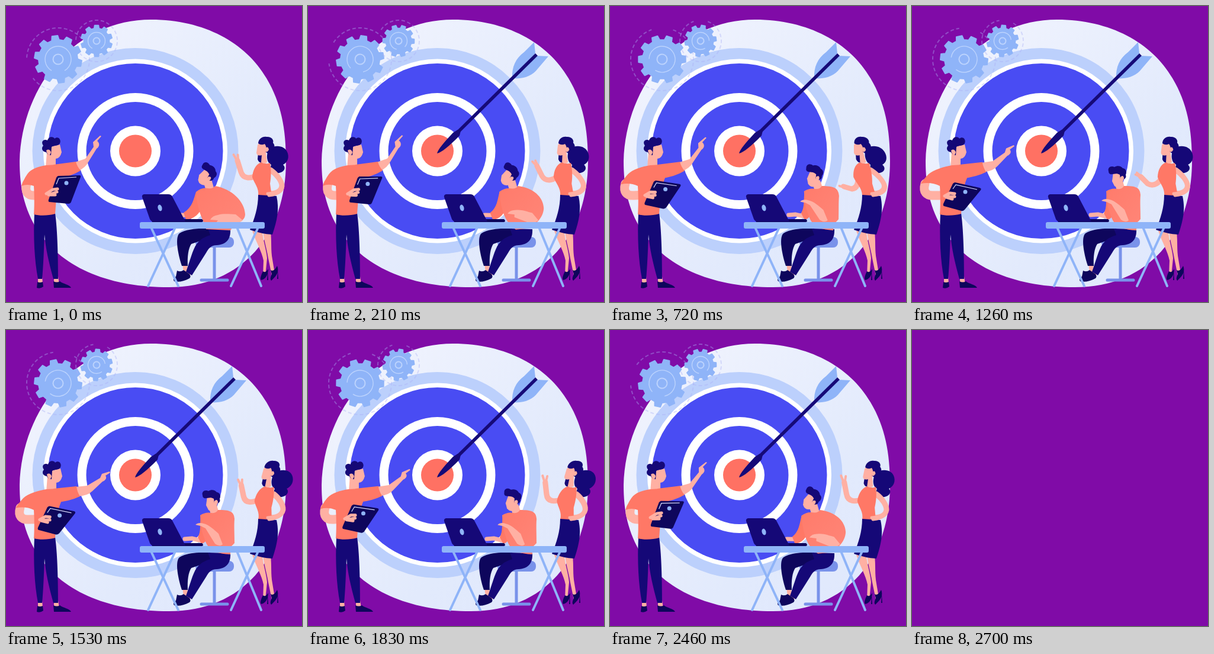
An HTML page that plays this animation: 500 px wide and 500 px high, repeating every 2.73 s.

```html
<!DOCTYPE html>
<html lang="en">
<head>
<meta charset="utf-8">
<title>On target</title>
<style>
  html, body { margin: 0; width: 100%; height: 100%; overflow: hidden; background: #800ba7; }
  svg { display: block; width: 100vw; height: 100vh; }
  .navy { fill: #150877; }
  .dark { fill: #0e065c; }
  .skin { fill: #ffb0a3; }
  .coral { fill: #ff7866; }
  .sky { fill: #8fb4f8; }
  .limb { fill: none; stroke: #ffb0a3; stroke-linecap: round; stroke-linejoin: round; }
  .rail { fill: none; stroke: #8fb4f8; stroke-width: 4; stroke-linecap: round; }
  .orbit { fill: none; stroke: #aab0f5; stroke-opacity: .4; stroke-width: 2; stroke-dasharray: 6 4; }
  .line { fill: none; stroke: #bcd3fd; stroke-width: 1.4; }
</style>
</head>
<body>
<svg viewBox="0 0 500 500">
  <defs>
    <linearGradient id="pale" x1="0" y1="0" x2="1" y2="1">
      <stop offset="0" stop-color="#f3f5fe"/><stop offset=".65" stop-color="#e2eafc"/><stop offset="1" stop-color="#e0e8fd"/>
    </linearGradient>
    <linearGradient id="shirt" x1="0" y1="0" x2="1" y2="1">
      <stop offset="0" stop-color="#ff7b6b"/><stop offset="1" stop-color="#ff8678"/>
    </linearGradient>
  </defs>
  <g id="scene">
    <path fill="url(#pale)" d="M245 23C335 23 405 62 440 122C465 164 473 208 473 262C473 385 400 475 275 475C180 475 98 446 54 380C30 342 23 305 23 262C27 130 120 23 245 23Z"/>
    <g id="rings"></g>
    <g id="gears"></g>

    <g id="arrow">
      <path class="sky" d="M345 122C344 103 351 88 365 78L382 61L384 80ZM345 122C364 124 379 118 388 106L406 85L386 84Z"/>
      <path d="M247 219L386 82" stroke="#160a78" stroke-width="5.5"/>
      <path fill="#160a78" d="M218 249C219 243 229 231 245 214L253 209L258 211L256 219C238 237 226 247 218 249Z"/>
    </g>

    <!-- man with tablet -->
    <g>
      <path class="skin" d="M54 457H61L62 469H54ZM81 457H88L90 470H81Z"/>
      <path class="navy" d="M48 350L83 350C87 378 88 425 88 461L80 461C72 432 67 410 65 386C64 414 63 440 61 461L54 461C48 430 46 390 48 350Z"/>
      <path class="dark" d="M53 466Q57 468 62 466L63 474Q58 478 52 476ZM80 465Q86 468 91 465C97 470 107 470 110 476H81Z"/>
      <g data-shift="nodL">
        <path class="skin" d="M69 247L74 238L91 234L94 247Q91 258 84 258L84 272L67 273Z"/>
        <path class="navy" d="M76 252C73 252 69 250 68 247C61 246 59 240 63 236C58 229 64 224 70 227C72 220 80 220 82 224C88 219 94 226 91 232C88 237 82 235 77 238Z"/>
        <path class="skin" d="M68 244Q73 240 76 247L74 252Q69 251 68 244Z"/>
      </g>
      <path class="skin" data-k="point" d="M116 264L134 258L148 238L147 230L159 219L161 220L154 228C159 232 158 238 153 241L140 262Q134 274 121 279Z"
        data-to="M118 265L137 263L159 250L162 243L175 239L176 241L168 246C171 250 168 254 163 256L146 272Q138 280 122 281Z"/>
      <path class="coral" data-k="point" d="M80 268L118 263Q120 271 126 278Q108 289 86 291Z" data-to="M80 268L119 264Q120 273 125 281Q108 289 86 291Z"/>
      <path class="limb" stroke-width="15" data-k="arm" d="M35 300C31 314 37 321 49 320L76 316" data-to="M22 300C18 314 24 321 37 320L62 320"/>
      <path class="coral" data-k="arm" d="M68 269C56 271 43 274 36 284C31 291 28 298 26 304Q36 300 47 304C48 320 48 340 47 352C58 355 72 354 83 351C85 335 84 310 94 288L85 268Z"
        data-to="M68 269C54 271 36 277 28 284C22 290 18 295 15 300Q33 297 47 304C48 320 48 340 47 352C58 355 72 354 83 351C85 335 84 310 94 288L85 268Z"/>
      <path class="dark" data-k="tablet" d="M88 287L124 286Q127 286 126 289L110 331Q109 334 105 334L73 331Q71 330 72 327L85 290Q86 288 88 287Z"
        data-to="M73 298L114 307Q118 308 116 311L89 344Q86 347 83 346L54 338Q52 337 53 334L69 300Q71 298 73 298Z"/>
      <path fill="none" stroke="#d7dcfb" stroke-width="1.2" data-k="tablet" d="M85 301L89 291L119 289" data-to="M69 309L74 302L110 310"/>
      <path fill="none" stroke="#8fb4f8" stroke-width="7" stroke-linecap="round" data-k="tablet" d="M102 299L102 299.1" data-to="M90 314L90 314.1"/>
      <path class="limb" stroke-width="5" data-k="arm" d="M68 317L79 310L87 309M72 319L86 314M72 319L83 319" data-to="M55 321L64 316L72 317M58 322L72 322M58 323L68 326"/>
    </g>

    <!-- woman -->
    <g>
      <path class="skin" d="M416 380L433 380C434 396 440 412 441 426L438 456L434 458L435 430C432 414 422 398 416 380ZM434 380L447 382C449 398 447 412 450 428L454 452L449 455L443 426C441 412 436 398 434 380Z"/>
      <path class="dark" d="M434 448Q438 452 443 444C443 454 438 462 431 463Q428 460 434 448ZM442 446L443 463L441 463ZM447 446Q452 450 458 439C461 446 459 453 453 459L448 464Q445 461 449 453ZM459 446L460 461L458 461Z"/>
      <g id="bust">
        <path class="navy" d="M446 241C454 234 472 235 476 249C479 259 473 266 468 268C474 274 469 281 461 282C450 284 445 275 448 268C439 264 439 247 446 241ZM426 248L437 246L440 264Q428 268 425 259Z"/>
        <path class="limb" stroke-width="9" d="M447 277C458 285 466 296 466 304C465 313 456 317 444 317"/>
        <path class="limb" stroke-width="9" data-k="wave" d="M426 280C423 301 419 308 410 309L397 305" data-mid="M426 278C422 302 404 304 396 298L385 284" data-to="M428 284C412 292 400 290 397 277L392 257"/>
        <path class="limb" stroke-width="4" data-k="wave" d="M400 307L390 304M400 308L394 305" data-mid="M388 286L376 280M387 284L378 276" data-to="M392 259L386 246M393 257L394 247"/>
        <path class="coral" d="M431 264Q440 268 446 265C448 278 448 288 446 300L449 321L426 320C428 308 419 299 416 289C417 278 421 268 431 264Z"/>
        <path class="skin" d="M425 235Q428 229 438 230L445 237Q442 245 439 248L441 264Q436 268 431 264L432 252Q424 254 423 248Z"/>
        <path class="navy" d="M426 232C427 224 433 220 440 221C448 220 453 226 451 231C456 236 453 245 446 244L442 249L438 246C440 240 440 237 437 233Q431 236 426 232Z"/>
        <path class="skin" d="M438 240Q443 236 444 243Q441 248 438 246Z"/>
      </g>
      <path class="navy" d="M426 319L457 321C462 344 458 362 450 386Q431 385 412 378C420 359 426 340 426 319Z"/>
      <path class="limb" stroke-width="5" d="M450 316L442 317M451 319L444 320"/>
    </g>

    <!-- man at desk -->
    <g>
      <path d="M352 400V462M330 463H374" fill="none" stroke="#7992ea" stroke-width="5" stroke-linecap="round"/>
      <rect x="320" y="390" width="65" height="18" rx="8" fill="#7992ea"/>
      <path class="skin" d="M298 434L306 434L307 449L300 450ZM304 446L314 449L309 459L302 457Z"/>
      <path class="dark" d="M345 376C325 375 303 377 293 384C286 390 289 414 297 439L307 439C306 424 308 409 313 402L345 391Z"/>
      <path class="navy" d="M341 376L379 377C380 394 372 403 356 404C346 404 342 410 338 417L314 455L304 449C311 430 315 412 322 402Q330 391 345 387Z"/>
      <path class="dark" d="M289 447Q295 450 300 446L310 453Q313 457 310 460C301 465 291 467 284 465Q281 461 287 457Z"/>
      <path class="limb" stroke-width="7" data-k="sit" d="M297 353L308 354L318 350" data-to="M302 353L314 352L330 356"/>
      <path class="coral" data-k="sit" d="M321 314C317 326 315 340 300 349L304 361C318 360 328 350 332 338Z" data-to="M329 314C327 328 330 340 324 350L330 361C338 360 342 350 344 338Z"/>
      <path class="limb" stroke-width="14" data-k="sit" d="M340 294L344 308" data-to="M350 300L353 311"/>
      <path fill="url(#shirt)" data-k="sit" d="M321 314Q331 306 341 308Q350 309 353 304C382 309 403 330 404 352C404 360 397 365 388 367L379 379L338 377C334 362 323 348 321 314Z"
        data-to="M328 313Q337 307 347 309Q355 310 358 304C378 304 385 306 386 319C385 330 386 345 386 360L380 366L379 379L338 377C339 362 331 340 328 313Z"/>
      <path class="skin" data-k="sit" d="M345 361Q349 354 358 353C369 350 378 352 388 352L400 362Q394 368 378 367L354 367L358 362Z"
        data-to="M320 329Q325 324 334 327C343 329 351 337 359 344L366 362Q361 367 353 361L337 335L329 331Z"/>
      <g id="head">
        <path class="skin" d="M340 281L357 283L356 304Q349 310 342 304L338 296Z"/>
        <path class="navy" d="M332 279C330 273 336 269 342 272C347 269 353 270 356 274C362 275 363 281 361 285Q363 291 357 293L352 292L351 285C345 281 340 285 335 284Q332 283 332 279Z"/>
        <path class="skin" d="M352 289Q357 284 358 291Q357 297 352 295Z"/>
      </g>
    </g>

    <path class="rail" d="M246 376L291 473M285 376L240 473M391 376L431 473M425 376L380 473"/>
    <rect class="sky" x="226" y="365" width="211" height="11" rx="3"/>
    <path class="dark" d="M245 360H331Q333 361 333 364L331 365H247Z"/>
    <path class="navy" d="M233 318H274Q279 318 281 322L303 364H249Q245 364 243 360L230 323Q229 319 233 318Z"/>
    <ellipse class="sky" cx="260" cy="341" rx="3.5" ry="5.5" transform="rotate(-14 260 341)"/>
  </g>
</svg>
<script>
const LOOP = 2730, BLANK = 2700;
const TIMES = [0, 420, 720, 1260, 1530, 2130];
const TRACKS = {
  arm: [0, .27, .7, 1, .85, .12],
  tablet: [0, .3, .7, 1, .95, .45],
  point: [0, 0, .13, .8, 1, .5],
  nodL: [0, -2, -4, -2, 1, 2],
  sit: [0, .78, .95, 1, 1, .88],
  tilt: [1, .75, .4, 0, 0, .65],
  lean: [0, -6, -13, -3, 10, 10],
  wave: [1.85, 1, 0, .8, 1.8, 2],
  spin: [0, .64, .91, 1, 1, .77]
};
const $ = id => document.getElementById(id);
const add = (parent, tag, attrs) => {
  const el = document.createElementNS('http://www.w3.org/2000/svg', tag);
  for (const k in attrs) el.setAttribute(k, attrs[k]);
  return parent.appendChild(el);
};
const place = (el, value) => el.setAttribute('transform', value);
const clamp = x => Math.max(0, Math.min(1, x));

// Smooth periodic curve through the keys
function sample(v, t) {
  const n = v.length;
  const time = i => TIMES[(i + n) % n] + LOOP * Math.floor(i / n);
  const val = i => v[(i + n) % n];
  const slope = i => (val(i + 1) - val(i - 1)) / (time(i + 1) - time(i - 1));
  let i = n - 1;
  while (t < TIMES[i]) i--;
  const h = time(i + 1) - time(i), u = (t - time(i)) / h, w = 1 - u;
  return w * w * ((1 + 2 * u) * val(i) + u * h * slope(i)) +
         u * u * ((3 - 2 * u) * val(i + 1) - w * h * slope(i + 1));
}

const nums = d => d.match(/-?[\d.]+/g).map(Number);
const morphs = [...document.querySelectorAll('[data-k]')].map(el => {
  const d = el.getAttribute('d');
  const poses = [d, el.dataset.mid, el.dataset.to].filter(Boolean).map(nums);
  return { el, d, poses, key: el.dataset.k };
});
function morph({ el, d, poses, key }, now) {
  const k = now[key], i = Math.max(0, Math.min(poses.length - 2, Math.floor(k)));
  const a = poses[i], b = poses[i + 1];
  let j = 0;
  el.setAttribute('d', d.replace(/-?[\d.]+/g, () => {
    const x = a[j] + (b[j] - a[j]) * (k - i);
    j++;
    return x.toFixed(2) + ' ';
  }));
}

const ringSizes = [[174, '#bcd0fc'], [155.5, '#fff'], [148, '#494cf3'], [98, '#fff'], [83, '#494cf3'], [42.5, '#fff'], [27.5, '#ff7163']];
for (const [r, fill] of ringSizes) add($('rings'), 'circle', { cx: 218.5, cy: 245, r, fill });

const polar = (r, deg) => {
  const a = deg * Math.PI / 180;
  return (r * Math.cos(a)).toFixed(2) + ' ' + (r * Math.sin(a)).toFixed(2);
};
const arc = (r, from, to) => `M${polar(r, from)}A${r} ${r} 0 1 1 ${polar(r, to)}`;

function gear({ x, y, outer, root, orbit, inner, hub, phase, turn }) {
  const g = add($('gears'), 'g', { transform: `translate(${x} ${y})` });
  const ring = add(g, 'path', { class: 'orbit', d: arc(orbit, 183, 503) });
  const wheel = add(g, 'g', {});
  let d = '';
  for (let i = 0; i < 10; i++) {
    const a = phase + i * 36;
    d += (i ? 'L' : 'M') + [[root, -11], [outer, -7], [outer, 7], [root, 11]]
      .map(([r, o]) => polar(r, a + o)).join('L');
  }
  add(wheel, 'path', { class: 'sky', d: d + 'Z', stroke: '#8fb4f8', 'stroke-width': 2, 'stroke-linejoin': 'round' });
  add(wheel, 'path', { class: 'line', d: arc(inner, 120, 420) });
  add(wheel, 'circle', { class: 'line', r: hub, style: 'stroke-width:2' });
  return k => {
    place(ring, `rotate(${118 * k})`);
    place(wheel, `rotate(${turn * k})`);
  };
}
const gears = [
  gear({ x: 88, y: 90, outer: 40, root: 33, orbit: 53, inner: 22, hub: 8.5, phase: -98, turn: 68 }),
  gear({ x: 153, y: 59, outer: 26.5, root: 21.5, orbit: 35, inner: 14.5, hub: 5.5, phase: -90, turn: -68 })
];

const shifts = [...document.querySelectorAll('[data-shift]')];

function draw(t) {
  $('scene').style.display = t < BLANK ? '' : 'none';
  const now = {};
  for (const k in TRACKS) now[k] = sample(TRACKS[k], t);
  morphs.forEach(m => morph(m, now));
  gears.forEach(turn => turn(now.spin));
  shifts.forEach(el => place(el, `translate(${now[el.dataset.shift]} 0)`));
  const lean = now.lean / 85;
  place($('bust'), `matrix(1 0 ${-lean} 1 ${320 * lean} 0)`);
  const k = now.tilt;
  place($('head'), `translate(${-13 * k} ${-5 * k}) rotate(${38 * k} 347 295)`);
  const fly = clamp((t - 60) / 150), off = 49 * (1 - fly * fly);
  place($('arrow'), `translate(${off} ${-off})`);
  $('arrow').style.opacity = clamp((t - 30) / 90);
}

function tick() {
  draw(performance.now() % LOOP);
  requestAnimationFrame(tick);
}
tick();
</script>
</body>
</html>
```
